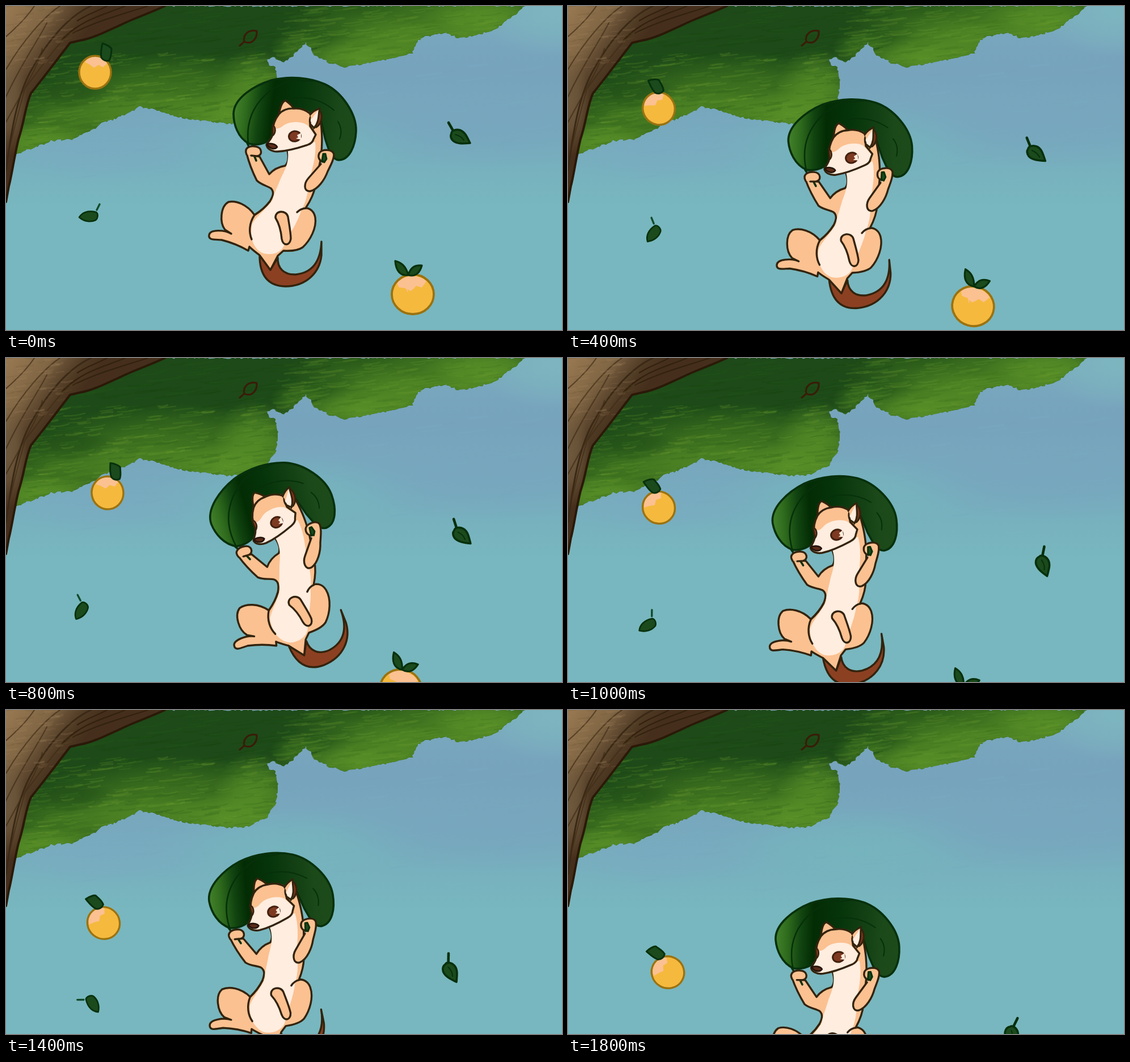
Recreate the animation shown at these times as an HTML page with a canvas. Size 980 px wide and 572 px high, loop 2000 ms.

```html
<!DOCTYPE html>
<html lang="en">
<head>
<meta charset="utf-8">
<title>Weasel drifting down under a leaf</title>
<style>
html, body { margin: 0; overflow: hidden; }
canvas { display: block; }
</style>
</head>
<body>
<canvas id="stage" width="980" height="572"></canvas>
<script>
const W = 980, H = 572, STEP = 200, STEPS = 10;
const INK = '#33230d', PEACH = '#fbc191', CREAM = '#ffeddf', BROWN = '#8c4022';
const LEAF = '#1b4a1d', LEAF_INK = '#07300c', GOLD = '#f5b93e', GOLD_INK = '#9b7210';

const stage = document.getElementById('stage').getContext('2d');
const backdrop = document.createElement('canvas');
backdrop.width = W;
backdrop.height = H;
let ctx = backdrop.getContext('2d');

let seed = 11;
const rand = () => (seed = seed * 16807 % 2147483647) / 2147483647;
const between = (a, b) => a + (b - a) * rand();

function shape(d, fill, ink, width = 3.4) {
  const path = new Path2D(d);
  if (fill) { ctx.fillStyle = fill; ctx.fill(path); }
  if (ink) { ctx.strokeStyle = ink; ctx.lineWidth = width; ctx.stroke(path); }
}

function ellipse(x, y, rx, ry, tilt, fill, ink, width = 3) {
  ctx.beginPath();
  ctx.ellipse(x, y, rx, ry, tilt, 0, 7);
  if (fill) { ctx.fillStyle = fill; ctx.fill(); }
  if (ink) { ctx.strokeStyle = ink; ctx.lineWidth = width; ctx.stroke(); }
}

function gradient(x0, y0, x1, y1, ...stops) {
  const g = ctx.createLinearGradient(x0, y0, x1, y1);
  stops.forEach(([at, color]) => g.addColorStop(at, color));
  return g;
}

// Soft elliptical spot; rgb is a "r,g,b" string.
function glow(x, y, rx, ry, rgb, alpha = 1) {
  ctx.save();
  ctx.translate(x, y);
  ctx.scale(rx, ry);
  const g = ctx.createRadialGradient(0, 0, 0, 0, 0, 1);
  g.addColorStop(0, `rgba(${rgb},${alpha})`);
  g.addColorStop(.45, `rgba(${rgb},${alpha * .75})`);
  g.addColorStop(1, `rgba(${rgb},0)`);
  ctx.fillStyle = g;
  ctx.fillRect(-1, -1, 2, 2);
  ctx.restore();
}

function dabs(count, x0, y0, x1, y1, colors, alpha, length) {
  ctx.globalAlpha = alpha;
  for (let i = 0; i < count; i++) {
    const x = between(x0, x1), y = between(y0, y1), l = between(.3, 1) * length;
    ctx.strokeStyle = colors[i % colors.length];
    ctx.lineWidth = between(1, 4);
    ctx.beginPath();
    ctx.moveTo(x, y);
    ctx.quadraticCurveTo(x + l / 2, y + between(-3, 3), x + l, y - l * .12);
    ctx.stroke();
  }
  ctx.globalAlpha = 1;
}

// Polyline whose segments are broken into small uneven brush edges.
function ragged(points, rough) {
  let d = 'M' + points[0];
  for (let i = 1; i < points.length; i++) {
    const [x0, y0] = points[i - 1], [x1, y1] = points[i];
    const n = Math.ceil(Math.hypot(x1 - x0, y1 - y0) / 4);
    for (let k = 1; k <= n; k++) {
      d += `L${x0 + (x1 - x0) * k / n + between(-rough, rough)} ${y0 + (y1 - y0) * k / n + between(-rough, rough)}`;
    }
  }
  return d + 'Z';
}

function drawSky() {
  ctx.fillStyle = gradient(0, 0, 0, H, [0, '#79a9be'], [.2, '#77a3bd'], [.38, '#77a9bd'],
    [.52, '#77b2be'], [.62, '#78b7bf'], [1, '#78b7bf']);
  ctx.fillRect(0, 0, W, H);
  glow(970, 10, 150, 80, '125,182,191', .9);
  glow(500, 245, 240, 75, '117,181,189', .8);
  glow(170, 255, 200, 60, '121,170,192', .7);
  glow(850, 210, 260, 80, '119,165,190', .6);
  dabs(120, 20, 90, 960, 320, ['#7fb4c4', '#719fba', '#75b3bc'], .13, 60);
}

function drawFoliage() {
  const edge = [[0, 0], [915, 0], [895, 18], [860, 42], [825, 52], [800, 57], [775, 48], [735, 54],
    [722, 66], [716, 84], [690, 90], [650, 98], [600, 108], [570, 100], [545, 87], [528, 64],
    [514, 80], [490, 99], [470, 90], [460, 95], [464, 104], [474, 107], [480, 130], [475, 165],
    [460, 190], [425, 206], [390, 208], [350, 203], [300, 196], [270, 184], [235, 178], [205, 194],
    [170, 207], [150, 220], [115, 235], [80, 238], [50, 250], [12, 263], [0, 255]];
  const outline = new Path2D(ragged(edge, 1.8));
  ctx.save();
  ctx.clip(outline);
  ctx.fillStyle = '#1d4a18';
  ctx.fillRect(0, 0, W, 270);
  const light = '88,143,39', mid = '66,118,32';
  glow(300, 165, 260, 85, mid);
  glow(110, 215, 150, 75, mid);
  glow(60, 245, 110, 40, light);
  glow(390, 192, 120, 45, light);
  glow(440, 150, 75, 75, light, .85);
  glow(230, 185, 130, 35, light, .6);
  glow(720, 40, 230, 85, mid);
  glow(620, 92, 120, 38, light);
  glow(700, 65, 130, 45, light, .7);
  glow(850, 25, 130, 55, light);
  glow(520, 75, 55, 35, mid, .8);
  glow(620, 0, 90, 24, '40,88,24', .7);
  glow(110, 150, 80, 30, '34,80,24', .7);
  dabs(520, 20, 85, 480, 250, ['#6c9e2e', '#2a5d17', '#558b25', '#3a701c'], .22, 42);
  dabs(300, 470, 5, 915, 105, ['#6c9b2d', '#37691d', '#5b8f2a'], .2, 46);
  dabs(90, 110, 10, 540, 90, ['#17410f', '#275a1a'], .25, 60);
  ctx.restore();
}

function drawTrunk() {
  const trunk = 'M0 0H280C250 14 225 22 205 32C170 48 150 58 130 61L113 65C92 92 68 124 44 154C34 176 32 206 22 235C14 268 10 300 5 318L0 346Z';
  ctx.save();
  ctx.clip(new Path2D(trunk));
  ctx.fillStyle = gradient(0, 0, 115, 85, [0, '#987952'], [.45, '#826745'], [.62, '#644d33'], [.8, '#4e3923'], [1, '#452f1c']);
  ctx.fillRect(0, 0, 290, 350);
  glow(5, 175, 34, 90, '112,91,63', .9);
  shape('M150 0C110 18 72 62 42 118C20 160 10 215 0 290', null, '#3a2916', 3);
  shape('M95 0C68 18 30 60 0 112M50 0C38 18 16 40 0 54M72 30C52 68 26 104 0 160M64 75C58 105 32 145 0 205M130 35C98 55 68 100 34 145C24 175 12 230 2 265', null, 'rgba(65,45,23,.7)', 2.2);
  shape('M250 0C208 14 160 26 118 48M210 0C178 14 130 24 98 60M178 0C160 10 140 16 126 26', null, '#33210f', 2.2);
  dabs(90, -20, 0, 110, 110, ['#b08f62', '#66502f'], .16, 22);
  ctx.restore();
  shape('M280 0C250 14 225 22 205 32C170 48 150 58 130 61L113 65C92 92 68 124 44 154C34 176 32 206 22 235C14 268 10 300 5 318L0 346', null, '#2b1908', 4);
}

function drawTwigLeaf() {
  shape('M412 70L420 63C417 50 428 41 442 44C443 57 434 69 420 63', null, '#3a1c08', 3.2);
}

function drawUmbrella() {
  shape('M428 243C408 232 401 208 401 190C402 162 438 140 468 131C500 123 535 126 562 138C592 152 618 190 617 221C616 246 606 272 586 272C572 270 568 250 563 236L556 205L480 225C462 243 444 247 428 243Z',
    gradient(401, 200, 617, 225, [0, '#42802a'], [.09, '#2f6b1d'], [.2, '#114410'], [.3, '#032c04'],
      [.5, '#06340a'], [.7, '#123f13'], [.85, '#1b4919'], [1, '#1d4b1a']), LEAF_INK, 3.6);
  shape('M518 129C462 138 420 180 427 243', null, '#06300a', 2.6);
  shape('M482 172C505 156 548 158 578 184M585 204Q594 218 588 235M500 128Q520 134 540 132', null, '#06300a', 2);
}

function drawTail() {
  shape('M447 440C447 470 458 494 492 495C530 495 553 470 556 440L556 416C555 440 547 470 511 474C490 475 478 463 479 444L466 466Z', BROWN, INK);
}

function drawBody() {
  const torso = 'M496 255C500 272 495 279 492 282C480 284 470 290 464 297L447 266L424 260C428 276 436 296 442 308C450 316 460 317 467 322C473 328 471 335 465 345C455 358 446 364 438 369C425 350 405 343 392 346C378 354 376 382 386 395L397 402C385 395 360 394 358 404C356 414 368 412 380 413C400 418 415 425 427 432L429 425C436 432 442 436 447 440L466 466L479 441L489 432C505 433 516 431 523 426C536 414 548 392 545 373C542 358 530 356 528 357C538 342 543 330 545 318L555 268C558 240 557 225 555 205Z';
  shape(torso, PEACH, INK);
  shape('M496 252C501 275 490 292 484 305C476 325 472 332 470 342C460 358 440 372 434 385C428 410 438 430 452 436C470 442 488 434 491 420C505 395 516 376 520 362C530 345 533 325 534 308C542 282 547 262 545 240Z', CREAM);
  shape('M465 345C455 358 446 364 438 369C428 384 428 400 433 412', null, INK);
  shape('M513 364C518 359 524 357 529 357', null, INK);
  shape('M475 374C474 360 494 360 497 372C499 385 502 400 502 411C500 424 488 424 486 411C485 400 483 387 475 374Z', PEACH, INK);
}

function drawArms() {
  shape('M425 242L429 250M437 263L441 273', null, LEAF_INK, 3.6);
  shape('M424 262C419 250 430 246 440 248C453 250 452 265 442 265L432 264', PEACH, INK);
  shape('M555 279L533 304C525 313 524 328 536 327C550 324 562 306 567 292C573 280 578 270 578 262C576 252 556 252 552 260C549 268 553 273 558 275', PEACH, INK);
  shape('M559 261L563 261L565 270L561 276L557 273Z', LEAF, LEAF_INK, 3);
}

function drawHead() {
  shape('M481 191C483 178 488 168 493 167C500 172 505 177 507 181C518 180 528 183 535 187L544 228L541 237C530 247 505 254 478 257C468 257 459 251 459 245C465 238 472 232 470 222C470 210 474 200 481 191Z', PEACH);
  shape('M470 212C475 219 482 217 489 211C500 203 522 203 532 211L545 229L541 237C530 247 505 254 478 257C468 257 459 251 459 245C465 238 472 232 470 222Z', CREAM);
  shape('M550 182C559 188 559 206 547 214L540 213Z', '#7c3419', INK, 3);
  shape('M536 208C533 197 540 186 553 181C550 190 553 204 543 215Z', CREAM, INK, 3);
  shape('M536 190C540 186 546 183 553 181L538 200Z', PEACH);
  shape('M536 192C541 186 546 183 553 181', null, INK, 3);
  shape('M536 190C528 183 518 180 507 181C505 177 500 172 493 167C487 168 483 180 481 191C474 200 470 210 470 222C471 232 463 238 459 245C460 252 468 257 478 257C500 256 520 249 532 245C538 243 541 239 542 235L546 227L536 212V205M481 191C487 184 497 180 507 181', null, INK);
  shape('M470 210C476 214 476 224 470 229Z', BROWN, INK, 2.6);
  ellipse(509, 230, 10.5, 9, -.15, '#7d3a21', '#43200d', 3);
  shape('M520 224L513 228L515 232L511 234L520 236Z', CREAM);
  shape('M460 244C466 241 476 244 478 249C474 254 465 253 460 244Z', '#5b2c1a', '#231307', 2.6);
}

function drawWeasel() {
  ctx.translate(-509, -230);
  [drawUmbrella, drawTail, drawBody, drawArms, drawHead].forEach(part => part());
}

function drawSmallOrange() {
  ellipse(0, 0, 28, 29, 0, GOLD);
  shape('M-18 -18C-8 -32 14 -31 22 -16L14 -9L6 -13L-2 -8L-10 -14Z', PEACH);
  ellipse(0, 0, 28, 29, 0, null, GOLD_INK, 3.4);
  shape('M11 -26C9 -36 12 -44 13 -51C21 -49 28 -44 29 -41C28 -34 29 -28 25 -21C20 -19 14 -21 11 -26Z', LEAF, LEAF_INK, 3);
}

function drawBigOrange() {
  ellipse(0, 0, 37, 35, 0, GOLD);
  shape('M-28 -20C-16 -36 12 -35 24 -23L16 -12L6 -15L0 -8L-3 -3L-9 -4L-13 -11L-24 -12Z', PEACH);
  shape('M-10 -9l6 3l6 -4l-2 7l-7 1Z', GOLD);
  ellipse(0, 0, 37, 35, 0, null, GOLD_INK, 3.8);
  shape('M-8 -34C-22 -32 -30 -42 -31 -59C-20 -56 -12 -50 -8 -34C-4 -48 4 -52 16 -51C13 -40 6 -30 -8 -34Z', LEAF, LEAF_INK, 3.2);
}

function drawLeaf() {
  shape('M-19 -18L-11 -4', null, LEAF_INK, 4.6);
  shape('M-14 1C-14 -4 -6 -7 1 -5C10 -2 13 6 19 18C8 19 -4 20 -11 14C-15 10 -16 5 -14 1Z', LEAF, LEAF_INK, 3.6);
  shape('M-7 3Q4 6 8 13', null, LEAF_INK, 2);
}

function drawLeaflet() {
  shape('M-17 2C-12 -6 -2 -11 13 -7C17 -4 16 4 12 7C4 11 -8 10 -17 2Z', LEAF, LEAF_INK, 2.6);
  shape('M14 -11L19 -21', null, '#124a2b', 3.4);
}

// Each actor holds one [x, y, degrees] pose per step.
const actors = [
  [drawSmallOrange, [[157, 117, 0], [159, 147, -18], [160, 181, -35], [169, 209, -20], [179, 238, -9],
    [160, 264, -45], [166, 320, -48], [172, 376, -51], [147, 416, -23], [176, 463, -60]]],
  [drawLeaflet, [[146, 371, 0], [148, 386, -24], [150, 402, -48], [134, 424, -51], [132, 446, -54],
    [140, 472, -26], [146, 495, -70], [153, 519, -117], [125, 555, -58], [135, 605, -58]]],
  [drawLeaf, [[799, 224, 0], [798, 239, 4], [825, 253, 8], [800, 280, 10], [804, 306, 12],
    [842, 359, 41], [812, 407, 36], [787, 455, 31], [823, 510, -1], [788, 570, 56]]],
  [drawWeasel, [[509, 230, 0], [505, 249, -3], [500, 268, -6], [488, 279, -14], [477, 290, -22],
    [474, 312, -10], [473, 334, -11], [472, 356, -11.6], [483, 392, -21], [477, 436, -5]]],
  [drawBigOrange, [[717, 509, 0], [715, 519, 8], [714, 530, 16], [705, 557, 17], [696, 585, 17],
    [695, 613, 17], [695, 650, 17], [695, 690, 17], [695, 730, 17], [695, 770, 17]]]
];

function drawStep(step) {
  ctx.drawImage(backdrop, 0, 0);
  for (const [draw, poses] of actors) {
    const [x, y, degrees] = poses[step];
    ctx.save();
    ctx.translate(x, y);
    ctx.rotate(degrees * Math.PI / 180);
    draw();
    ctx.restore();
  }
}

ctx.lineCap = ctx.lineJoin = 'round';
[drawSky, drawFoliage, drawTrunk, drawTwigLeaf].forEach(layer => layer());
ctx = stage;
ctx.lineCap = ctx.lineJoin = 'round';

let shown = -1;
function tick() {
  const step = Math.floor(performance.now() / STEP) % STEPS;
  if (step !== shown) drawStep(shown = step);
  requestAnimationFrame(tick);
}
tick();
</script>
</body>
</html>
```
